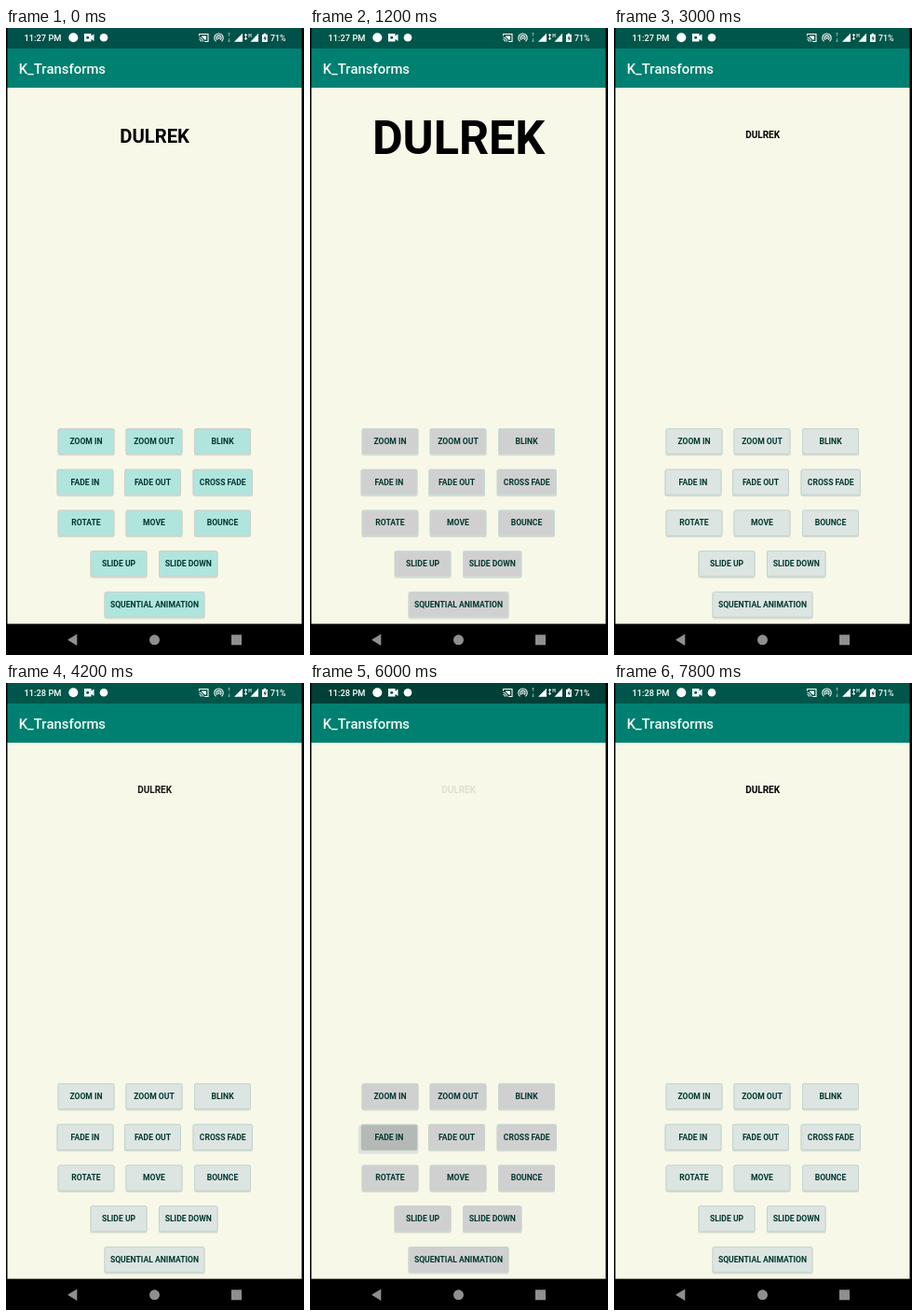
These frames come from a looping animation (320 px wide and 672 px high, 8 s). An HTML page:

```html
<!DOCTYPE html>
<html lang="en">
<head>
<meta charset="utf-8">
<title>Text animations</title>
<style>
  html, body { margin: 0; width: 100%; height: 100%; overflow: hidden; background: #000; }
  svg { display: block; width: 100%; height: 100%; font-family: Roboto, sans-serif; }
  #buttons text { font-size: 8.6px; font-weight: 700; fill: #00372f; text-anchor: middle; }
</style>
</head>
<body>
<svg viewBox="0 0 320 672">
  <rect width="320" height="672" fill="#000"/>
  <rect id="status" x="1.5" width="316" height="22"/>
  <rect x="1.5" y="22" width="316" height="42" fill="#008070"/>
  <rect x="1.5" y="64" width="316" height="574.6" fill="#f8f8e8"/>

  <g fill="#fff">
    <text id="clock" x="19.5" y="13.6" font-size="9.3" font-weight="500"></text>
    <circle cx="72.3" cy="10.3" r="5"/>
    <path d="M84 6h7.5v2.6l3-2.2v7.6l-3-2.2v2.7h-7.5z"/>
    <circle cx="87.7" cy="10.2" r="1.5" fill="#00514a"/>
    <circle cx="105" cy="10.3" r="4.3"/>
    <path d="M207.5 8.5v-2h9.5v8h-4M207.5 10.5a4 4 0 0 1 4 4M207.5 12.5a2 2 0 0 1 2 2" fill="none" stroke="#fff" stroke-width="1.1"/>
    <path d="M210 8.5h5v4h-2a5 5 0 0 0-3-3z"/>
    <path d="M225.5 14.3a4.7 4.7 0 1 1 6 0M227 12.6a2.5 2.5 0 1 1 3 0" fill="none" stroke="#fff" stroke-width="1.1"/>
    <circle cx="228.5" cy="10.8" r="1.1"/>
    <path d="M239.5 5v4m-1.2-2.5l1.2-1.5 1.2 1.5M239.5 15v-4m-1.2 2.5l1.2 1.5 1.2-1.5" fill="none" stroke="#80b8b0" stroke-width=".8"/>
    <path d="M245 14.8h9v-9zM262.5 14.8h8.5v-9z"/>
    <path d="M257.5 6.5v6m-1.5-4.5l1.5-1.5 1.5 1.5m-3 3l1.5 1.5 1.5-1.5" fill="none" stroke="#fff" stroke-width=".9"/>
    <text x="260.3" y="9.6" font-size="5" font-weight="700">H</text>
    <path d="M275 7h1.6v-1.2h2.6v1.2h1.6v8h-5.8z"/>
    <path d="M278.4 8l-2 3.4h1.4v2.6l2-3.5h-1.4z" fill="#00514a"/>
    <text x="284" y="13.5" font-size="8.7" font-weight="500">71%</text>
    <text x="13.7" y="49" font-size="14.9" font-weight="500" fill="#f4fcf8">K_Transforms</text>
  </g>

  <text id="word" y="4.05" font-size="10" font-weight="700" text-anchor="middle">DULREK</text>
  <g id="buttons"></g>

  <g fill="#8c918b">
    <path d="M66 655.8l10.3-6.2v12.4z"/>
    <circle cx="159.5" cy="655.8" r="5.5"/>
    <rect x="242" y="650.3" width="11" height="11"/>
  </g>
</svg>
<script>
const LOOP = 8000, STEP = 200;
const $ = id => document.getElementById(id);

// label, x, y, width
const specs = [
  ["ZOOM IN", 56, 429, 60], ["ZOOM OUT", 129, 429, 60], ["BLINK", 202.5, 429, 60],
  ["FADE IN", 55, 472.7, 60], ["FADE OUT", 127.5, 472.7, 60], ["CROSS FADE", 201, 472.7, 63.5],
  ["ROTATE", 56, 516.5, 60], ["MOVE", 129, 516.5, 60], ["BOUNCE", 202.5, 516.5, 60],
  ["SLIDE UP", 91, 560.2, 60], ["SLIDE DOWN", 164.5, 560.2, 62.5],
  ["SQUENTIAL ANIMATION", 106, 604, 107]
];
const presses = { "ZOOM OUT": 1720, "BLINK": 3560, "FADE IN": 5850 };

// start time, button fill, edge, status bar
const tints = [
  [0, "#b0e5dd", "#cbd0ca", "#00514a"],
  [600, "#d0d0d0", "#c6dcd6", "#00564a"],
  [1400, "#dce5e1", "#c2d3ce", "#00564a"],
  [5800, "#d0d0d0", "#c8d4d0", "#004036"],
  [6400, "#dce5e1", "#c2d3ce", "#00564a"]
];

function add(parent, tag, attrs) {
  const el = document.createElementNS("http://www.w3.org/2000/svg", tag);
  set(el, attrs);
  return parent.appendChild(el);
}
function set(el, attrs) {
  for (const key in attrs) el.setAttribute(key, attrs[key]);
}

const buttons = specs.map(([label, x, y, w]) => {
  const g = add($("buttons"), "g", {});
  const glow = add(g, "rect", { x: x - 3, y: y + 1, width: w + 4.5, height: 31, rx: 2, fill: "#dce4df" });
  add(g, "rect", { x: x - .5, y: y + 1, width: w + 1, height: 28.5, rx: 2, fill: "#d9ded2" });
  const face = add(g, "rect", { x, y: y + .4, width: w, height: 27.2, rx: 1.5, "stroke-width": 1 });
  const ripple = add(g, "rect", { y: y + 1, height: 27, rx: 1.5, fill: "#b5b9b6" });
  add(g, "text", { x: x + w / 2, y: y + 16.8 }).textContent = label;
  return { x, w, glow, face, ripple, press: presses[label] };
});

const clamp = v => Math.min(1, Math.max(0, v));
const ease = v => (1 - Math.cos(Math.PI * clamp(v))) / 2;

function wordScale(t) {
  return t < 1750 ? 1 + 5 * clamp((t + 412) / 2000) : 6 - 5 * ease((t - 1750) / 1100);
}
function wordAlpha(t) {
  if (t < 3720) return 1;
  if (t >= 6100) return ease((t - 6100) / 1000);
  const phase = (t - 3720) / 600 % 2;
  return ease(phase < 1 ? phase : 2 - phase);
}

function draw(t) {
  const [, fill, edge, bar] = tints.filter(k => k[0] <= t).pop();
  $("status").setAttribute("fill", bar);
  $("clock").textContent = t < 3600 ? "11:27 PM" : "11:28 PM";
  set($("word"), {
    transform: `translate(159.6 114.3) scale(${wordScale(t)})`,
    opacity: wordAlpha(t)
  });
  for (const { x, w, glow, face, ripple, press } of buttons) {
    const age = t - press;
    const down = age >= 0 && age < 450;
    const left = down ? w * Math.max(0, .6 - age / 200) : w;
    set(face, { fill, stroke: edge });
    set(ripple, { x: x + left, width: w - left });
    glow.setAttribute("opacity", down ? 1 : 0);
  }
}

const start = performance.now();
function tick() {
  const t = (performance.now() - start) % LOOP;
  draw(Math.floor(t / STEP) * STEP);
  requestAnimationFrame(tick);
}
tick();
</script>
</body>
</html>
```
